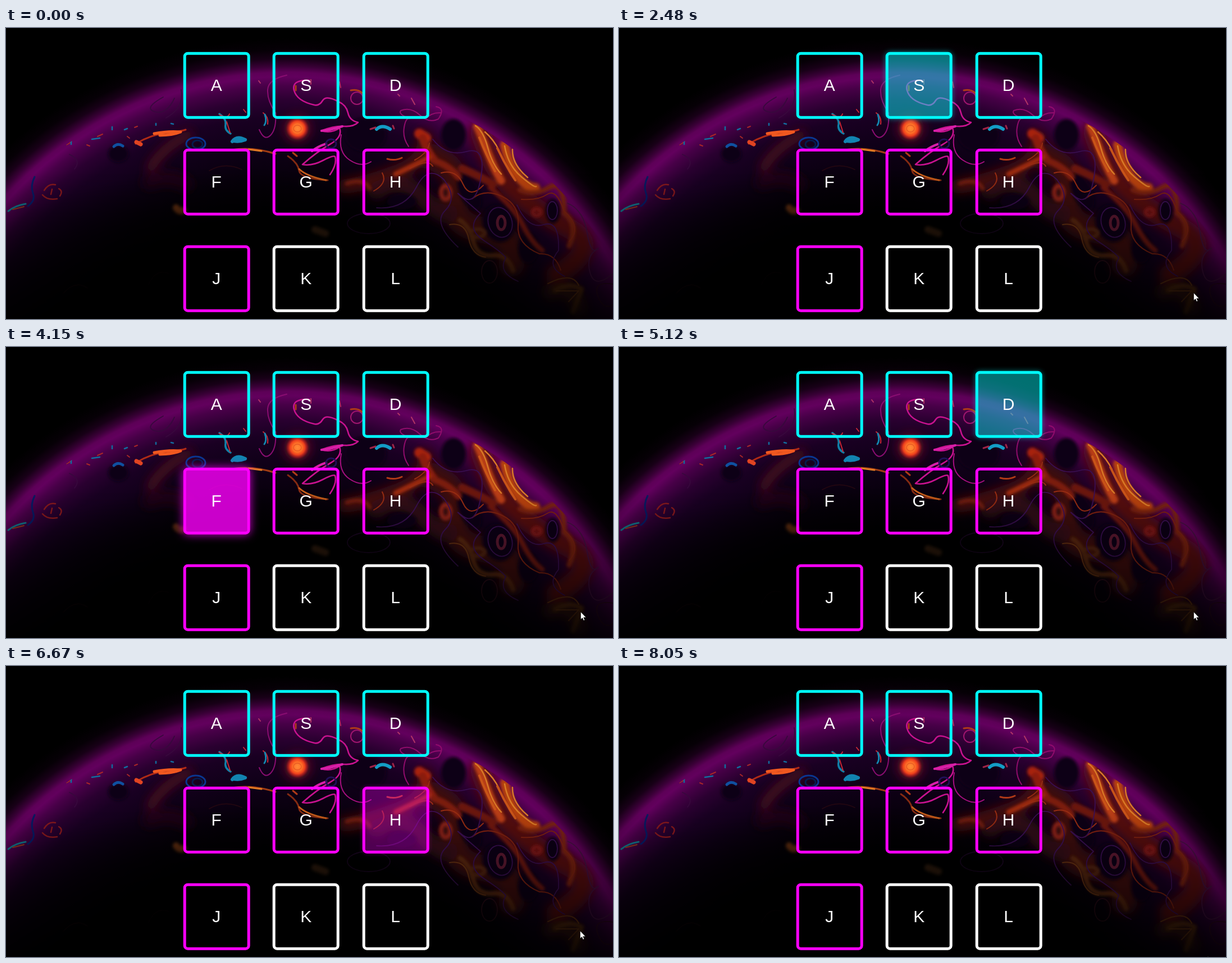
An HTML page for the animation above (8120 ms loop, 1081 px wide and 518 px high).

```html
<!DOCTYPE html>
<html lang="en">
<head>
<meta charset="utf-8">
<title>Drum pads</title>
<style>
html, body { margin: 0; width: 100%; height: 100%; overflow: hidden; background: #000; }
.stage { position: relative; width: 1081px; height: 518px; overflow: hidden; }
.scene, .cursor { position: absolute; left: 0; top: 0; }
.scene path, .scene ellipse { fill: none; stroke-linecap: round; stroke-linejoin: round; }
.scene .solid > * { fill: currentColor; }

.pad {
  --c: #0ff;
  position: absolute; box-sizing: border-box; width: 119px; height: 119px;
  left: calc(315.5px + var(--col) * 159.5px);
  top: calc(43px + var(--row) * 172px);
  transform: translate(-.3px, -.3px);
  padding-bottom: 1.4px;
  border: 5px solid var(--c); border-radius: 8px;
  display: flex; align-items: center; justify-content: center;
  font: 30px "Liberation Sans", Arial, sans-serif; color: #fff;
  background: transparent;
}
.pink { --c: #f0f; }
.white { --c: #fff; }
.hit { animation: hit 8120ms var(--at) infinite; }
@keyframes hit {
  0% { background-color: transparent; box-shadow: 0 0 0 transparent; animation-timing-function: ease; }
  2.463% { background-color: var(--c); box-shadow: 0 0 20px var(--c); animation-timing-function: ease; }
  4.926%, 100% { background-color: transparent; box-shadow: 0 0 0 transparent; }
}

.cursor { animation: move 8120ms linear infinite; }
@keyframes move {
  0%, 1.1% { transform: translate(1013px, 522px); }
  1.11% { transform: translate(1013px, 511px); }
  3.7% { transform: translate(1013px, 471px); }
  5.2% { transform: translate(1017px, 459px); }
  7.39%, 70.8% { transform: translate(1023px, 471px); }
  70.81%, 92.1% { transform: translate(1022px, 471px); }
  94% { transform: translate(1028px, 486px); }
  95.9% { transform: translate(1036px, 518px); }
  99.13% { transform: translate(1048px, 520px); }
  99.14%, 100% { transform: translate(1048px, 516.5px); }
}
</style>
</head>
<body>
<div class="stage">
<svg class="scene" width="1081" height="518" viewBox="0 0 1081 518">
  <defs>
    <radialGradient id="planet" gradientUnits="userSpaceOnUse" cx="500" cy="758" r="740">
      <stop offset=".56" stop-color="#000"/>
      <stop offset=".66" stop-color="#07000b"/>
      <stop offset=".74" stop-color="#0f0017"/>
      <stop offset=".81" stop-color="#190022"/>
      <stop offset=".85" stop-color="#2a0030"/>
      <stop offset=".885" stop-color="#470047"/>
      <stop offset=".907" stop-color="#62005d"/>
      <stop offset=".918" stop-color="#5d0057"/>
      <stop offset=".932" stop-color="#3a0037"/>
      <stop offset=".95" stop-color="#180017"/>
      <stop offset=".972" stop-color="#060006"/>
      <stop offset="1" stop-color="#000"/>
    </radialGradient>
    <radialGradient id="ember">
      <stop offset="0" stop-color="#ff8a38"/>
      <stop offset=".35" stop-color="#ff7428"/>
      <stop offset=".6" stop-color="#ee3f1c"/>
      <stop offset=".8" stop-color="#a01a20" stop-opacity=".75"/>
      <stop offset="1" stop-color="#500a20" stop-opacity="0"/>
    </radialGradient>
    <radialGradient id="shade" gradientUnits="userSpaceOnUse" cx="0" cy="0" r="1" gradientTransform="translate(400 560) scale(560 310)">
      <stop offset=".4" stop-color="#000" stop-opacity=".9"/>
      <stop offset=".75" stop-color="#000" stop-opacity=".5"/>
      <stop offset="1" stop-color="#000" stop-opacity="0"/>
    </radialGradient>
    <linearGradient id="dusk" x1="0" y1="0" x2="0" y2="1">
      <stop offset=".5" stop-color="#000" stop-opacity="0"/>
      <stop offset=".75" stop-color="#000" stop-opacity=".36"/>
      <stop offset="1" stop-color="#000" stop-opacity=".84"/>
    </linearGradient>
    <filter id="haze" x="-20%" y="-20%" width="140%" height="140%"><feGaussianBlur stdDeviation="9"/></filter>
    <filter id="soft" x="-20%" y="-20%" width="140%" height="140%"><feGaussianBlur stdDeviation="2.6"/></filter>
    <filter id="fine" x="-20%" y="-20%" width="140%" height="140%"><feGaussianBlur stdDeviation=".7"/></filter>
    <clipPath id="disc"><circle cx="500" cy="758" r="676"/></clipPath>
  </defs>
  <rect width="1081" height="518" fill="url(#planet)"/>

  <g clip-path="url(#disc)">
    <!-- broad warm haze -->
    <g filter="url(#haze)">
      <path d="M745 195Q750 235 700 255T605 282" stroke="#48100f" stroke-width="26"/>
      <path d="M760 230Q810 250 800 300T850 360T900 420" stroke="#3c0a10" stroke-width="46"/>
      <path d="M845 185Q865 250 900 285T1000 355T980 440" stroke="#560f0c" stroke-width="36"/>
      <path d="M660 290Q700 260 740 300T790 330" stroke="#330b14" stroke-width="30"/>
      <path d="M325 190Q280 212 258 248" stroke="#4a0d1a" stroke-width="16"/>
      <path d="M255 275Q290 260 320 278" stroke="#220616" stroke-width="25"/>
      <path d="M970 470Q1010 455 1020 500" stroke="#3a1607" stroke-width="26"/>
      <circle cx="519" cy="179" r="24" fill="#5a0c20"/>
    </g>
    <!-- dark pools -->
    <g class="solid" color="#0e0016" filter="url(#soft)">
      <ellipse cx="797" cy="190" rx="22" ry="28"/>
      <ellipse cx="825" cy="292" rx="17" ry="35" transform="rotate(-25 825 292)"/>
      <ellipse cx="877" cy="348" rx="28" ry="34" transform="rotate(-20 877 348)"/>
      <ellipse cx="930" cy="392" rx="18" ry="27"/>
      <ellipse cx="974" cy="326" rx="13" ry="22"/>
      <ellipse cx="705" cy="309" rx="26" ry="14"/>
      <ellipse cx="640" cy="190" rx="37" ry="30"/>
      <ellipse cx="200" cy="224" rx="18" ry="15"/>
    </g>
    <!-- lava -->
    <g filter="url(#soft)">
      <path d="M736 188L748 196" stroke="#a82410" stroke-width="18"/>
      <path d="M742 196Q750 220 762 234" stroke="#8a1e0e" stroke-width="14"/>
      <path d="M754 230Q730 243 694 260" stroke="#9c2a10" stroke-width="9"/>
      <path d="M762 236Q790 245 806 266" stroke="#7c1a0e" stroke-width="12"/>
      <path d="M839 175Q850 200 860 226T882 272" stroke="#b83c12" stroke-width="14"/>
      <path d="M888 208Q894 240 910 262T943 284" stroke="#b54010" stroke-width="16"/>
      <path d="M812 250Q840 262 868 278" stroke="#6a160d" stroke-width="14"/>
      <path d="M915 288Q940 300 967 284T994 330Q1020 348 1003 388" stroke="#79200d" stroke-width="9"/>
      <path d="M862 284Q904 318 920 350T955 396" stroke="#6f180e" stroke-width="9"/>
      <path d="M808 342Q825 352 832 380T868 405Q893 402 903 432" stroke="#5c2a0c" stroke-width="8"/>
      <path d="M978 467Q1004 452 1025 465L1010 505" stroke="#5b2d0a" stroke-width="8"/>
      <path d="M607 277Q637 266 648 286" stroke="#701d10" stroke-width="7"/>
      <path d="M303 320Q308 328 316 325" stroke="#8f4212" stroke-width="12"/>
      <path d="M550 359L569 366" stroke="#573315" stroke-width="12"/>
      <ellipse cx="783" cy="293" rx="8" ry="12" stroke="#8a2016" stroke-width="8"/>
      <ellipse cx="945" cy="328" rx="7" ry="6" stroke="#801715" stroke-width="7"/>
      <ellipse cx="840" cy="365" rx="13" ry="7" stroke="#552810" stroke-width="6"/>
    </g>
    <g filter="url(#fine)">
      <path d="M836 174Q850 183 858 213T882 260M853 185Q869 199 878 218M888 210Q894 245 918 265T944 282M902 216Q901 243 929 266" stroke="#d87a26" stroke-width="2.5"/>
      <path d="M875 214Q889 244 907 271M843 195Q854 224 871 255" stroke="#c85418" stroke-width="4"/>
      <path d="M728 235Q752 222 754 205M760 246Q752 232 719 250M655 290Q680 276 670 258M775 258Q802 251 814 278T850 280" stroke="#962c12" stroke-width="2"/>
      <path d="M918 305Q948 307 964 296T994 326Q1027 355 1003 380M830 304Q853 285 884 300T912 350T950 402Q978 400 988 431" stroke="#7d2110" stroke-width="2"/>
      <path d="M790 350Q818 345 824 375T854 408M965 455Q1008 433 1020 458M980 468H1020L1002 487" stroke="#693312" stroke-width="2"/>
    </g>
    <!-- violet contour lines -->
    <g filter="url(#fine)" stroke="#3a0f52" stroke-width="1.8">
      <ellipse cx="880" cy="346" rx="21" ry="27" transform="rotate(-18 880 346)"/>
      <ellipse cx="882" cy="347" rx="7" ry="12" stroke="#5c1830" stroke-width="5"/>
      <ellipse cx="861" cy="434" rx="14" ry="20" stroke="#300d1a"/>
      <ellipse cx="973" cy="325" rx="9" ry="16"/>
      <ellipse cx="646" cy="348" rx="38" ry="18" stroke="#24082f"/>
      <path d="M760 198Q785 230 820 220T846 265T812 300T845 330Q817 356 852 379T890 409Q875 435 912 451"/>
      <path d="M660 320Q710 324 731 283T780 270Q805 303 782 325T805 390M910 315Q930 359 958 350T984 396Q960 425 995 442"/>
      <path d="M1000 312Q1028 323 1035 365T1055 392Q1032 405 1040 435T1080 438" stroke="#43103f"/>
      <path d="M1081 456Q1044 450 1054 477T1081 492" stroke="#300820"/>
      <path d="M300 125Q286 155 265 149T280 123M312 110Q318 142 285 160M113 225Q135 235 122 251" stroke="#38083d"/>
      <path d="M102 472Q124 448 145 463M254 456Q267 428 290 437M362 254Q390 238 420 252" stroke="#240711"/>
    </g>
    <!-- magenta filaments -->
    <g filter="url(#fine)" stroke="#c8128f" stroke-width="2.6">
      <path d="M540 93Q508 92 513 111T549 137Q558 139 564 129T592 131Q606 137 609 151T627 168Q619 176 602 175T561 183Q580 188 594 178Q600 194 577 207T528 243Q545 246 564 236T586 229Q590 242 577 261"/>
      <path d="M597 190Q591 221 612 235T650 238" stroke="#a80f80" stroke-width="2"/>
      <path d="M717 211Q706 195 709 177T719 161Q698 154 703 147Q721 140 737 155T770 162Q783 143 766 140M750 159Q760 150 774 151" stroke="#900c6c" stroke-width="2"/>
      <ellipse cx="625" cy="125" rx="11" ry="11" stroke="#9f156e" stroke-width="2"/>
      <path d="M500 84Q467 91 466 110T480 151Q482 180 471 191T451 181" stroke="#8a0d71" stroke-width="2"/>
      <path d="M562 183Q577 182 599 175M570 206Q555 211 545 219" stroke="#d81fa8" stroke-width="4"/>
      <path d="M543 92V100M450 94L453 98M594 96L596 106M698 118L701 121M722 125L728 136" stroke="#b03565" stroke-width="2"/>
    </g>
    <!-- bright fragments -->
    <g filter="url(#fine)">
      <path d="M231 206Q258 190 285 187T320 181" stroke="#b02a16" stroke-width="3"/>
      <path d="M264 188Q289 183 311 185Q296 191 274 191" stroke="#f05820" stroke-width="5"/>
      <path d="M232 203L240 207" stroke="#e04422" stroke-width="7"/>
      <path d="M402 217Q439 211 480 224" stroke="#a03c14" stroke-width="3"/>
      <path d="M432 216L455 219" stroke="#e07a24" stroke-width="3"/>
      <path d="M502 228Q520 240 522 254T573 271" stroke="#842a12" stroke-width="3"/>
      <path d="M522 251Q535 264 570 271" stroke="#c65c1a" stroke-width="3"/>
      <path d="M679 233Q693 237 705 231M511 222L518 228M108 207L116 202M614 111Q626 108 635 116M516 103V111" stroke="#b03a18" stroke-width="3"/>
      <path d="M68 289Q76 276 88 279M65 297Q73 307 91 304M94 286Q102 290 96 299M82 287L80 296" stroke="#84181c" stroke-width="2.5"/>
      <path d="M4 326Q16 316 35 313" stroke="#127084" stroke-width="3"/>
      <path d="M12 323L32 318" stroke="#8c3818" stroke-width="2"/>
      <path d="M51 265Q43 281 48 294T39 317" stroke="#061a60" stroke-width="3"/>
      <ellipse cx="338" cy="206" rx="17" ry="11" stroke="#0a3690" stroke-width="3"/>
      <ellipse cx="341" cy="207" rx="9" ry="7" stroke="#061a4c" stroke-width="3"/>
      <ellipse cx="579" cy="206" rx="9" ry="8" stroke="#201057" stroke-width="3"/>
      <path d="M380 153Q393 162 391 172T400 188" stroke="#1080a8" stroke-width="3.5"/>
      <path d="M380 154Q394 163 398 153M393 167L399 186M458 151Q468 158 466 171M423 145L427 150" stroke="#c82836" stroke-width="2"/>
      <path d="M461 154Q465 166 460 173" stroke="#1288b0" stroke-width="3"/>
      <path d="M403 202Q411 191 426 199Q416 203 405 201" stroke="#1284b0" stroke-width="6"/>
      <path d="M660 180Q670 171 684 180" stroke="#139dc5" stroke-width="6"/>
      <path d="M649 180L658 177M689 174L691 179" stroke="#a02448" stroke-width="3"/>
      <path d="M192 211Q199 204 208 210" stroke="#0f50a0" stroke-width="5"/>
      <path d="M153 198L167 196M189 181V176M267 170V173M294 170L298 171M211 181L216 179M116 201V207" stroke="#126c9e" stroke-width="2.5"/>
      <path d="M163 193L172 189M216 193L220 196M229 177L234 175M144 208L149 210" stroke="#a82628" stroke-width="2"/>
    </g>
    <circle cx="519" cy="179" r="22" fill="url(#ember)"/>
    <ellipse cx="519" cy="179" rx="7" ry="6" stroke="#e85a24" stroke-width="1.5"/>
  </g>
  <rect width="1081" height="518" fill="url(#dusk)"/>
  <rect width="1081" height="518" fill="url(#shade)"/>
</svg>

<div class="pad hit" style="--col:0;--row:0;--at:1414ms">A</div>
<div class="pad hit" style="--col:1;--row:0;--at:2426ms">S</div>
<div class="pad hit" style="--col:2;--row:0;--at:4856ms">D</div>
<div class="pad pink hit" style="--col:0;--row:1;--at:3919ms">F</div>
<div class="pad pink hit" style="--col:1;--row:1;--at:5712ms">G</div>
<div class="pad pink hit" style="--col:2;--row:1;--at:6630ms">H</div>
<div class="pad pink" style="--col:0;--row:2">J</div>
<div class="pad white" style="--col:1;--row:2">K</div>
<div class="pad white" style="--col:2;--row:2">L</div>

<svg class="cursor" width="14" height="20" viewBox="0 0 14 20">
  <path d="M.5 .5V14L3.6 11.2L5.6 16L7.7 15.1L5.7 10.4H10Z" fill="#fff" stroke="#000" stroke-width=".6"/>
</svg>
</div>
</body>
</html>
```
